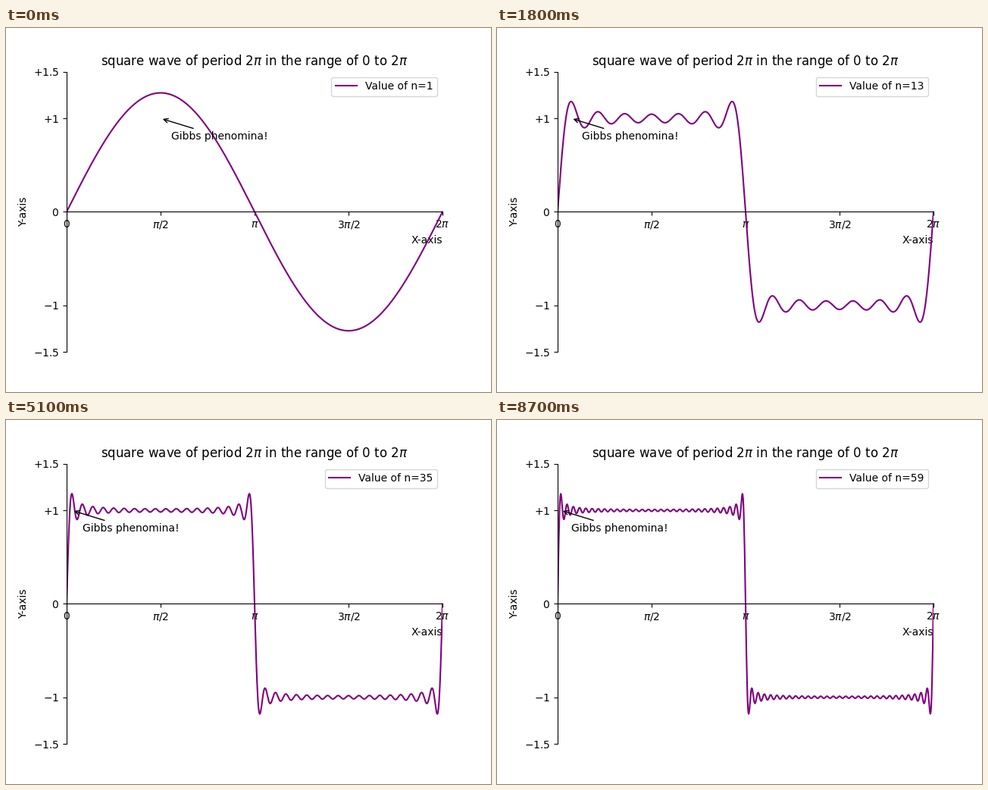
A matplotlib script that plays this animation: 640x480 px, repeating every 9 s.

```python
import numpy as np
import matplotlib.pyplot as plt
from matplotlib.animation import FuncAnimation

FRAMES = 30
INTERVAL = 300

plt.rcParams["font.family"] = "DejaVu Sans"
fig, ax = plt.subplots(figsize=(6.4, 4.8), dpi=100)

x = np.linspace(0, 2 * np.pi, 1000)


def partial_sum(n):
    """Fourier series of a square wave, odd harmonics up to n."""
    k = np.arange(1, n + 1, 2)[:, None]
    return 4 / np.pi * (np.sin(k * x) / k).sum(axis=0)


ax.set_xlim(0, 2 * np.pi)
ax.set_ylim(-1.5, 1.5)
ax.set_xticks(np.arange(5) * np.pi / 2,
              [r"$0$", r"$\pi/2$", r"$\pi$", r"$3\pi/2$", r"$2\pi$"])
ax.set_yticks([-1.5, -1, 0, 1, 1.5],
              [r"$-1.5$", r"$-1$", r"$0$", r"$+1$", r"$+1.5$"])
ax.spines[["top", "right"]].set_visible(False)
ax.spines["bottom"].set_position(("data", 0))
ax.set_xlabel("X-axis", loc="right")
ax.set_ylabel("Y-axis")
ax.set_title(r"square wave of period $2\pi$ in the range of 0 to $2\pi$")

line, = ax.plot(x, partial_sum(1), color="purple", lw=1.5, label="Value of n=1")
legend = ax.legend(loc="upper right")
note = ax.annotate("Gibbs phenomina!", xy=(np.pi / 2, 1), xytext=(10, -20),
                   textcoords="offset points",
                   arrowprops=dict(arrowstyle="->"))


def update(i):
    n = 2 * i + 1
    line.set_ydata(partial_sum(n))
    legend.get_texts()[0].set_text(f"Value of n={n}")
    note.xy = (np.pi / (n + 1), 1)  # first overshoot peak
    return line, legend, note


anim = FuncAnimation(fig, update, frames=FRAMES, interval=INTERVAL,
                     init_func=lambda: update(0), repeat=True, blit=False)
plt.show()
```
